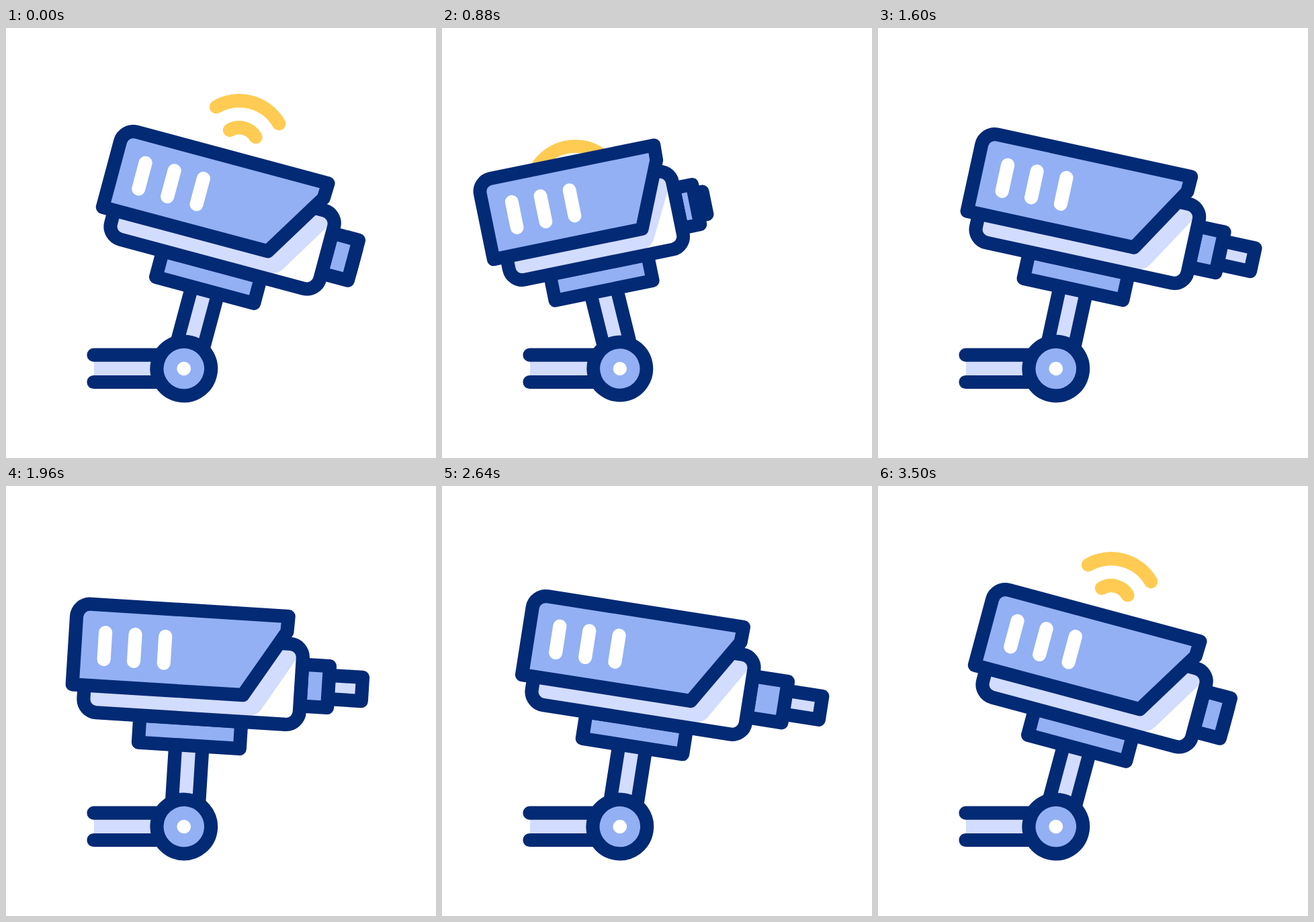
An HTML page that plays this animation: 640x640 px, repeating every 3.6 s.

```html
<!DOCTYPE html>
<html lang="en">
<head>
<meta charset="utf-8">
<title>Security camera</title>
<style>
  html, body { margin: 0; width: 100%; height: 100%; overflow: hidden; background: #fff; }
  svg { display: block; width: 100%; height: 100%; }
  .line { stroke: #032a75; stroke-width: 20.16; stroke-linejoin: round; stroke-linecap: round; }
  .blue { fill: #92b0f3; }
  .pale { fill: #d2dcfe; }
  .white { fill: #fff; }
  .none { fill: none; }
  .slit { fill: none; stroke: #fff; stroke-width: 20.16; stroke-linecap: round; }
  .wave { fill: none; stroke: #ffcb52; stroke-width: 20.16; stroke-linecap: round; }
</style>
</head>
<body>
<svg viewBox="0 0 640 640">
  <rect class="pale" x="131" y="487" width="110" height="40"/>
  <path class="line none" d="M130.5 486.7H240M130.5 527H240"/>
  <g id="head">
    <g id="wifi">
      <path class="wave" d="M-48.3 -48.3A68.3 68.3 0 0 1 48.3 -48.3M-20 -20A28.3 28.3 0 0 1 20 -20"/>
    </g>
    <path id="zoom" class="line pale"/>
    <path id="lens" class="line blue"/>
    <path id="poleFill" class="pale"/>
    <path id="pole" class="line none"/>
    <path class="line blue" d="M-75.6 -161V-120.9H75.6V-161Z"/>
    <path id="bodyFill" class="pale"/>
    <path id="shine" class="white"/>
    <path id="body" class="line none"/>
    <path id="hood" class="line blue"/>
    <path id="slits" class="slit"/>
    <circle class="line blue" r="40.3"/>
    <circle class="white" r="10.3"/>
  </g>
</svg>
<script>
const LOOP = 3600;
const el = id => document.getElementById(id);
const draw = (id, d) => el(id).setAttribute('d', d);

// Tracks: [time, value, time, value, ...]
const tilt = track([120, 15, 320, 3, 520, -10, 640, -13.8, 720, -16, 1180, 5, 1220, 6.4,
  1440, 15, 1600, 12.3, 1720, 8.9, 1960, 3.6, 2070, 2.2, 2260, 7.8, 2440, 11.3,
  2640, 8.9, 2810, 7.2, 3340, 14.7, 3480, 15]);
const turn = track([120, 0, 520, 1, 700, 1.15, 1220, 0.05, 1320, 0]);
const rise = track([120, 0, 400, -14, 520, -30, 650, -54, 1040, 130, 2840, 130, 3320, 0]);
const reach = track([720, 0, 1180, 49, 1300, 50, 2400, 50, 2640, 54, 2800, 58, 3240, 0]);
const push = track([2340, 0, 2640, 12, 2800, 20, 3240, 0]);

// Smooth curve through the keys, flat at every turning point
function track(keys) {
  const t = keys.filter((_, i) => i % 2 === 0);
  const v = keys.filter((_, i) => i % 2 === 1);
  const last = t.length - 1;
  const slope = i => (v[i + 1] - v[i]) / (t[i + 1] - t[i]);
  const tangent = t.map((_, i) => {
    if (i === 0 || i === last) return 0;
    const a = slope(i - 1), b = slope(i);
    return a * b > 0 ? 2 * a * b / (a + b) : 0;
  });
  return now => {
    if (now <= t[0]) return v[0];
    if (now >= t[last]) return v[last];
    let i = 0;
    while (now > t[i + 1]) i++;
    const h = t[i + 1] - t[i], u = (now - t[i]) / h, w = 1 - u;
    return v[i] * (1 + 2 * u) * w * w + v[i + 1] * u * u * (3 - 2 * u)
      + h * u * w * (tangent[i] * w - tangent[i + 1] * u);
  };
}

const box = (x1, y1, x2, y2) => `M${x1} ${y1}H${x2}V${y2}H${x1}Z`;

function roundBox(half, top, bottom, r) {
  return `M${-half} ${top}V${bottom - r}a${r} ${r} 0 0 0 ${r} ${r}H${half - r}` +
    `a${r} ${r} 0 0 0 ${r} ${-r}V${top + r}a${r} ${r} 0 0 0 ${-r} ${-r}H${-half + r}Z`;
}

function render(now) {
  const k = turn(now);
  el('head').setAttribute('transform',
    `translate(264.8 507) rotate(${tilt(now)}) scale(${1 - 0.022 * k})`);
  el('wifi').setAttribute('transform', `translate(${-6.1 - 7.6 * k} ${-340.5 + rise(now)})`);

  const half = 161 - 30 * k;
  const lensEnd = 201.8 - 44 * k + push(now);
  draw('lens', box(half, -252, lensEnd, -190));
  draw('zoom', box(lensEnd - 20, -238.3, lensEnd + reach(now), -203));

  const topShift = -0.8 * k, footShift = 3 * k;
  const pole = [-20.16 + topShift, 20.16 + topShift, 20.16 + footShift, -20.16 + footShift];
  draw('poleFill', `M${pole[0]} -121H${pole[1]}L${pole[2]} -40H${pole[3]}Z`);
  draw('pole', `M${pole[0]} -121L${pole[3]} -40M${pole[1]} -121L${pole[2]} -40`);

  const body = roundBox(half, -281.5, -161.2, 20);
  draw('bodyFill', body);
  draw('body', body);
  draw('shine', `M${164.5 - 26.5 * k} -281L${103.5 - 17 * k} -180.5` +
    `Q${97 - 17 * k} -171 ${84 - 17 * k} -170V-164H${half - 4}V-281Z`);

  const left = -179 + 27.7 * k, right = 136 - 20 * k;
  draw('hood', `M${left} -200.8V-302a20 20 0 0 1 20 -20H${right}L${right - 0.8} -299L75.3 -201Z`);
  draw('slits', [44.5, 89, 133.8].map(x => `M${left + x} -281V-241`).join(''));
}

function frame() {
  render(performance.now() % LOOP);
  requestAnimationFrame(frame);
}
frame();
</script>
</body>
</html>
```
